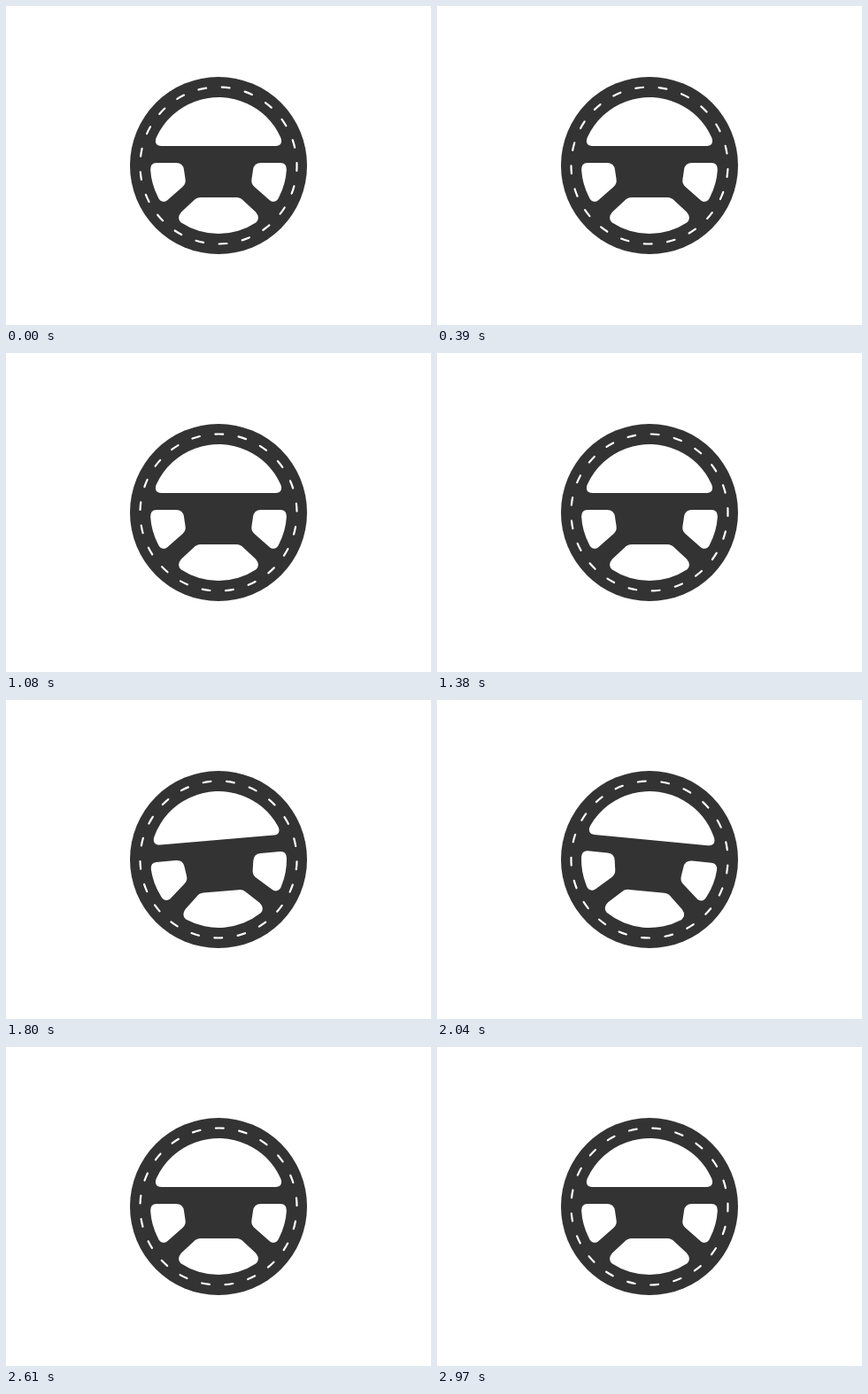
These frames come from a looping animation (480x360 px, 3000 ms). An HTML page with a canvas:

```html
<!DOCTYPE html>
<html lang="en">
<head>
<meta charset="utf-8">
<title>Steering wheel</title>
<style>
  html, body { margin: 0; width: 100%; height: 100%; overflow: hidden; background: #fff; }
  canvas { display: block; width: 480px; height: 360px; }
</style>
</head>
<body>
<canvas id="stage" width="480" height="360"></canvas>
<script>
const ctx = document.getElementById('stage').getContext('2d');
const LOOP = 3000, STEP = 30;
const RIM = 100, INNER = 77, STITCH = 88.5, STITCHES = 21;
const DARK = '#333', LIGHT = '#fff';
const rad = deg => deg * Math.PI / 180;

// Steering angle keys: time in ms, degrees
const turns = [[0, 0], [1615, 0], [1805, -4.9], [2070, 5.8], [2610, 0], [LOOP, 0]];

function steer(t) {
  const i = turns.findIndex(key => key[0] > t);
  const [t0, a] = turns[i - 1], [t1, b] = turns[i];
  const k = (1 - Math.cos(Math.PI * (t - t0) / (t1 - t0))) / 2;
  return a + (b - a) * k;
}

function topWindow() {
  const p = new Path2D();
  p.moveTo(-64.5, -22);
  p.bezierCurveTo(-70, -22, -73, -26, -69.8, -32.5);
  p.arc(0, 0, INNER, rad(205), rad(335));
  p.bezierCurveTo(73, -26, 70, -22, 64.5, -22);
  p.closePath();
  return p;
}

function sideWindow() {
  const p = new Path2D();
  p.moveTo(-70, -3);
  p.lineTo(-48, -3);
  p.quadraticCurveTo(-40, -3, -39, 5);
  p.lineTo(-37.5, 15);
  p.quadraticCurveTo(-36.5, 20.5, -40.5, 24);
  p.lineTo(-57, 38.5);
  p.bezierCurveTo(-60.5, 42, -66, 42, -68.6, 35);
  p.arc(0, 0, INNER, rad(153), rad(176.5));
  p.quadraticCurveTo(-77, -3, -70, -3);
  p.closePath();
  return p;
}

function bottomWindow() {
  const p = new Path2D();
  p.moveTo(-20, 36);
  p.lineTo(20, 36);
  p.quadraticCurveTo(25, 36, 28, 39.5);
  p.lineTo(42, 52.5);
  p.quadraticCurveTo(47.5, 59, 42.5, 64.2);
  p.arc(0, 0, INNER, rad(56.5), rad(123.5));
  p.quadraticCurveTo(-47.5, 59, -42, 52.5);
  p.lineTo(-28, 39.5);
  p.quadraticCurveTo(-25, 36, -20, 36);
  p.closePath();
  return p;
}

const top_ = topWindow(), side = sideWindow(), bottom = bottomWindow();

function drawWheel(angle) {
  ctx.fillStyle = DARK;
  ctx.beginPath();
  ctx.arc(0, 0, RIM, 0, 2 * Math.PI);
  ctx.fill();

  ctx.save();
  ctx.rotate(rad(angle));
  ctx.fillStyle = LIGHT;
  ctx.fill(top_);
  ctx.fill(bottom);
  ctx.fill(side);
  ctx.scale(-1, 1);
  ctx.fill(side);
  ctx.restore();
}

// The stitching advances by two gaps per loop, independent of steering
function drawStitches(t) {
  const gap = 2 * Math.PI / STITCHES;
  const start = rad(5.3 - 90) + 2 * gap * t / LOOP;
  const half = 4.4 / STITCH;
  ctx.strokeStyle = LIGHT;
  ctx.lineWidth = 2.2;
  ctx.lineCap = 'round';
  for (let i = 0; i < STITCHES; i++) {
    const a = start + i * gap;
    ctx.beginPath();
    ctx.arc(0, 0, STITCH, a - half, a + half);
    ctx.stroke();
  }
}

function draw(now) {
  const t = Math.floor((now % LOOP) / STEP) * STEP;
  ctx.fillStyle = LIGHT;
  ctx.fillRect(0, 0, 480, 360);
  ctx.save();
  ctx.translate(240, 180);
  drawWheel(steer(t));
  drawStitches(t);
  ctx.restore();
}

let begin;
function tick(now) {
  begin ??= now;
  draw(now - begin);
  requestAnimationFrame(tick);
}
draw(0);
requestAnimationFrame(tick);
</script>
</body>
</html>
```
